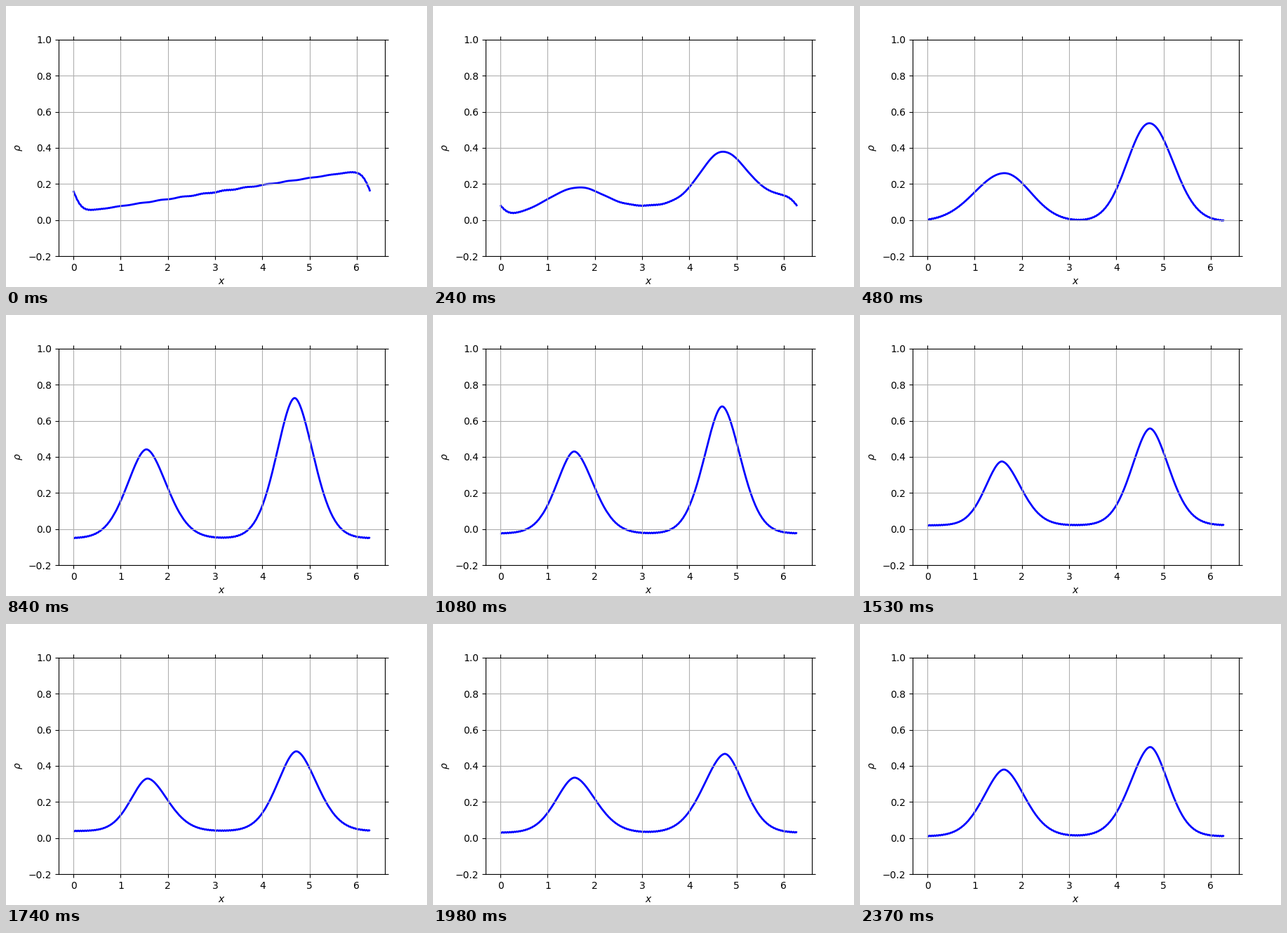
These frames come from a looping animation (600 px wide and 400 px high, 2.4 s). A matplotlib script:

```python
import numpy as np
import matplotlib.pyplot as plt
from matplotlib.animation import FuncAnimation

FRAMES, INTERVAL = 80, 30
TAU = 2 * np.pi
x = np.linspace(0, TAU, 256)


def ramp():
    """Smoothed, slightly rippled sawtooth that the density starts from."""
    jump = np.tanh((TAU - x) / 0.18) - np.tanh(x / 0.18)
    ripple = 0.002 * np.sin(14 * x + 0.92) * np.sin(x / 2)
    return 0.038 + 0.039 * x + 0.1225 * jump + ripple


def hill(center, height, left, right, power=1.8):
    """Bell with its own half-width on each side."""
    u = np.abs(x - center) / np.where(x < center, left, right)
    return height * 0.5 ** (u ** power)


# Density at the turning points of the motion, by frame number
poses = {
    0: ramp(),
    16: -0.007 + hill(1.63, 0.267, 0.74, 0.65, 2) + hill(4.70, 0.544, 0.55, 0.59, 2),
    28: -0.051 + hill(1.545, 0.493, 0.48, 0.505) + hill(4.685, 0.778, 0.452, 0.465),
    44: 0.002 + hill(1.575, 0.418, 0.398, 0.46) + hill(4.71, 0.633, 0.441, 0.447),
    58: 0.039 + hill(1.57, 0.291, 0.42, 0.495) + hill(4.72, 0.442, 0.47, 0.51),
    66: 0.03 + hill(1.57, 0.305, 0.46, 0.52) + hill(4.755, 0.437, 0.53, 0.475),
    79: 0.01 + hill(1.62, 0.37, 0.5, 0.513) + hill(4.72, 0.495, 0.5, 0.45),
}
times = np.array(list(poses))
curves = np.array(list(poses.values()))

# Grid-scale jitter, strongest around the density minima
jitter = 0.0017 * np.cos(x) ** 4 * (-1.0) ** np.arange(len(x))


def density(n):
    i = min(np.searchsorted(times, n, side="right"), len(times) - 1)
    u = (n - times[i - 1]) / (times[i] - times[i - 1])
    return (1 - u) * curves[i - 1] + u * curves[i] + jitter


fig, ax = plt.subplots(figsize=(6, 4), dpi=100)
line, = ax.plot(x, density(0), color="blue", lw=2, solid_capstyle="butt")
ax.set_ylim(-0.2, 1)
ax.set_xlabel("$x$")
ax.set_ylabel(r"$\rho$")
ax.tick_params(top=True, right=True)

# The grid lies over the curve, the frame over the grid
ax.grid(True)
ax.set_axisbelow(False)
for spine in ax.spines.values():
    spine.set_zorder(3)


def update(n):
    line.set_ydata(density(n))
    return line,


anim = FuncAnimation(fig, update, frames=FRAMES, interval=INTERVAL,
                     repeat=True, repeat_delay=0)
plt.show()
```
